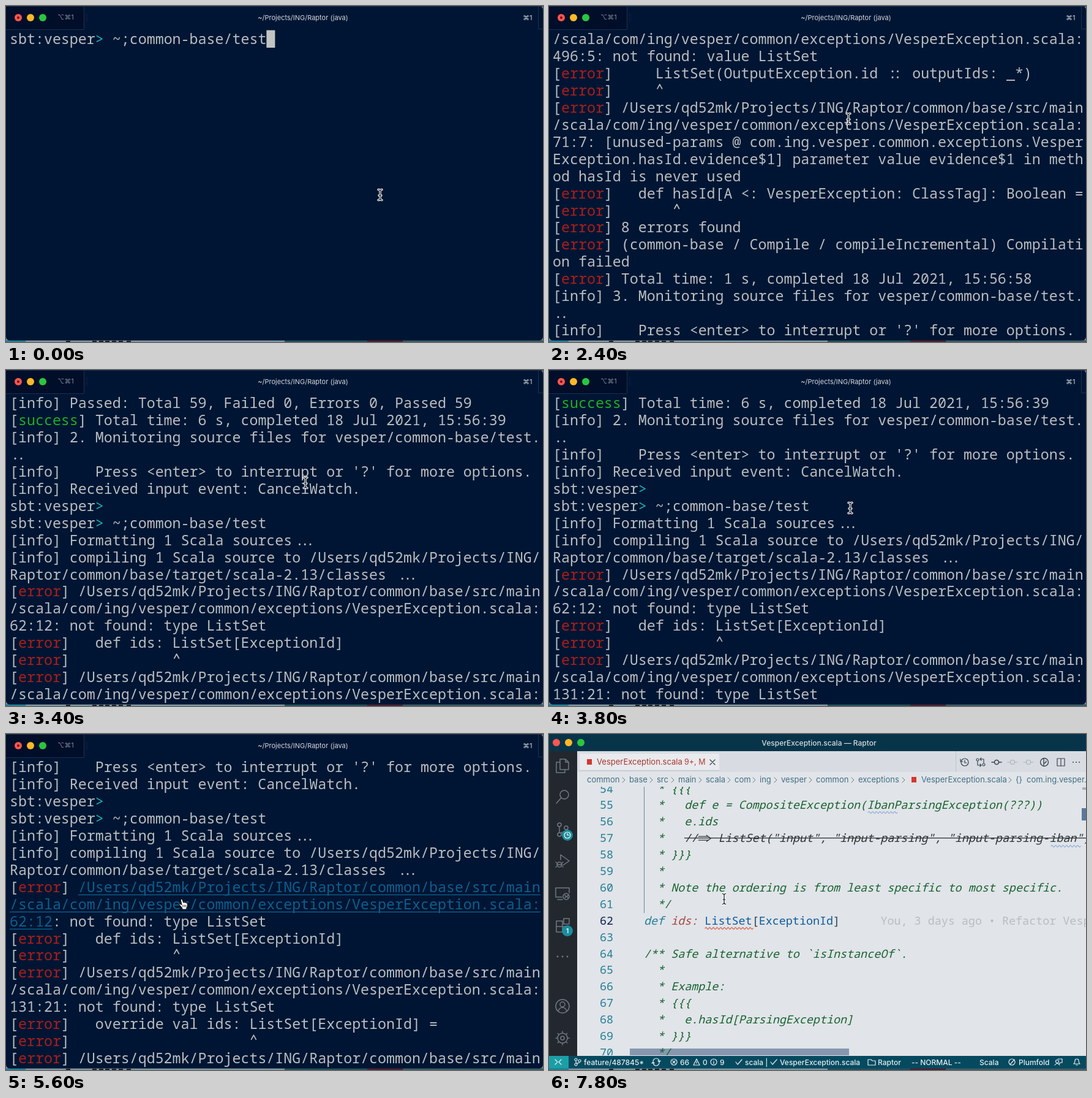
Recreate the animation shown at these times as an HTML page with a canvas. Size 877 by 548 pixels, loop 8 s.

```html
<!DOCTYPE html>
<html lang="en">
<head>
<meta charset="utf-8">
<title>From compiler error to editor</title>
<style>
html, body { margin: 0; width: 100%; height: 100%; overflow: hidden; background: #001533; }
canvas { display: block; width: 877px; height: 548px; }
</style>
</head>
<body>
<canvas></canvas>
<script>
const W = 877, H = 548, LOOP = 8000;
const canvas = document.querySelector('canvas');
const g = canvas.getContext('2d');
const dpr = window.devicePixelRatio || 1;
canvas.width = W * dpr;
canvas.height = H * dpr;
g.scale(dpr, dpr);

const MONO = '"Noto Sans Mono", monospace';
const UI = 'Inter, "DejaVu Sans", sans-serif';

// ---------- drawing helpers ----------
function rect(x, y, w, h, color) {
  g.fillStyle = color;
  g.fillRect(x, y, w, h);
}
function disc(x, y, r, color) {
  g.fillStyle = color;
  g.beginPath();
  g.arc(x, y, r, 0, 7);
  g.fill();
}
function text(str, x, y, color, font, align = 'left') {
  g.font = font;
  g.fillStyle = color;
  g.textAlign = align;
  g.fillText(str, x, y);
}
function icon(x, y, d, color, width = 1.2, fill) {
  const path = new Path2D(d);
  g.save();
  g.translate(x, y);
  g.lineJoin = g.lineCap = 'round';
  if (fill) { g.fillStyle = fill; g.fill(path); }
  g.strokeStyle = color;
  g.lineWidth = width;
  g.stroke(path);
  g.restore();
}
const circle = (r, x = 0, y = 0) => `M${x + r} ${y}a${r} ${r} 0 1 1 ${-2 * r} 0a${r} ${r} 0 1 1 ${2 * r} 0`;

function lights(x, y) {
  ['#fc5650', '#fdb827', '#29c73f'].forEach((c, i) => disc(x + 20 * i, y, 6, c));
}
function iBeam(x, y) {
  const d = 'M-3-8.5Q0-8.5 0-6Q0-8.5 3-8.5M0-6V6M-3 8.5Q0 8.5 0 6Q0 8.5 3 8.5M-2 1H2';
  icon(x, y, d, '#fff', 3.4);
  icon(x, y, d, '#111', 1.2);
}
function hand(x, y) {
  icon(x, y, 'M-4-7q1.6-1.8 3 0l2 5q1-1.5 2.4 0q1.4-1 2.2.6q1.7-.4 1.8 1.4v4l-1.6 3v2h-6.5' +
    'l-1.4-3l-4.2-4.6q.2-2 2.2-1.2l2 1.4z', '#111', 1.2, '#fff');
  icon(x, y, 'M0 2v3M2.4 2v3M4.7 2v3', '#111', 0.9);
}
function desktop() {
  rect(0, 0, W, H, '#7e96a0');
  rect(0, 545, 32, 3, '#2a7f96');
  for (const x of [98, 141, 152, 162, 173, 184, 197]) rect(x, 546, 7, 2, '#1a2026');
  rect(455, 545, 135, 3, '#26505a');
  rect(590, 545, 58, 3, '#4a2434');
  rect(648, 545, 229, 3, '#3d5c66');
}

// ---------- terminal ----------
const CELL = 13.98, ROW = 27.95, LEFT = 6, TOP = 40, ROWS = 18;
const TERM_FONT = `23.3px ${MONO}`;
const INK = '#b8bebf', LINK = '#0c5f8d';

const notFound = (pos, kind, code, caret) => [
  '[error] /Users/qd52mk/Projects/ING/Raptor/common/base/src/main',
  '/scala/com/ing/vesper/common/exceptions/VesperException.scala:',
  `${pos}: not found: ${kind} ListSet`,
  ...code,
  '[error]' + ' '.repeat(caret - 7) + '^',
];
const override = (mod = '') => [`[error]   override ${mod}val ids: ListSet[ExceptionId] =`];
const buffer = [
  '[info] Passed: Total 59, Failed 0, Errors 0, Passed 59',
  '[success] Total time: 6 s, completed 18 Jul 2021, 15:56:39',
  '[info] 2. Monitoring source files for vesper/common-base/test.',
  '..',
  "[info]    Press <enter> to interrupt or '?' for more options.",
  '[info] Received input event: CancelWatch.',
  'sbt:vesper>',
  'sbt:vesper> ~;common-base/test',
  '[info] Formatting 1 Scala sources...',
  '[info] compiling 1 Scala source to /Users/qd52mk/Projects/ING/',
  'Raptor/common/base/target/scala-2.13/classes ...',
  ...notFound('62:12', 'type', ['[error]   def ids: ListSet[ExceptionId]'], 19),
  ...notFound('131:21', 'type', override(), 28),
  ...notFound('172:21', 'type', override(), 28),
  ...notFound('173:21', 'value', [
    '[error]     errors.foldLeft(ListSet.empty[ExceptionId])(_ ++ _',
    '.ids) + CompositeException.id'], 28),
  ...notFound('272:27', 'type', override('final '), 34),
  ...notFound('273:9', 'value', ['[error]         ListSet(InputException.id :: inputIds: _*)'], 16),
  ...notFound('495:27', 'type', override('final '), 34),
  ...notFound('496:5', 'value', ['[error]     ListSet(OutputException.id :: outputIds: _*)'], 12),
  ...notFound('', '', [], 8).slice(0, 2),
  '71:7: [unused-params @ com.ing.vesper.common.exceptions.Vesper',
  'Exception.hasId.evidence$1] parameter value evidence$1 in meth',
  'od hasId is never used',
  '[error]   def hasId[A <: VesperException: ClassTag]: Boolean =',
  '[error]       ^',
  '[error] 8 errors found',
  '[error] (common-base / Compile / compileIncremental) Compilati',
  'on failed',
  '[error] Total time: 1 s, completed 18 Jul 2021, 15:56:58',
  '[info] 3. Monitoring source files for vesper/common-base/test.',
  '..',
  "[info]    Press <enter> to interrupt or '?' for more options.",
];
const COMMAND = 7, FIRST_ERROR = 11, END = buffer.length + 1 - ROWS;

const TOKENS = /((?<=^\[)(?:error|success)(?=\])|(?<=^sbt:vesper)>|\.{2,3}|\+\+|::|=>|\^)/;
const TOKEN_COLORS = { error: '#a81f1a', success: '#1fae22', '>': '#19b3b5' };
const LIGATURE_STEP = { '..': 10, '...': 8.8, '++': 11, '::': 8.5 };
const DRAWN_GLYPHS = { '=>': 'M2-3H21M2 3H21M18-7L26 0L18 7', '^': 'M3.2-3L7-10L10.8-3' };

function termLine(str, row, color = INK, col = 0) {
  const y = TOP + row * ROW + 22;
  for (const part of str.split(TOKENS)) {
    const x = LEFT + col * CELL;
    const step = LIGATURE_STEP[part];
    if (step) {
      const start = x + (part.length - 1) * (CELL - step) / 2;
      [...part].forEach((ch, i) => text(ch, start + i * step, y, color, TERM_FONT));
    } else if (DRAWN_GLYPHS[part]) {
      icon(x, y - 8, DRAWN_GLYPHS[part], color, 1.7);
    } else {
      text(part, x, y, TOKEN_COLORS[part] || color, TERM_FONT);
    }
    col += part.length;
  }
}
function linkPart(str, row, from) {
  const y = TOP + row * ROW;
  const x = LEFT + from * CELL, w = str.length * CELL;
  rect(x, y, w, ROW, '#001533');
  termLine(str, row, LINK, from);
  rect(x, y + 26, w, 1.4, LINK);
}
function block(row, col = 0) {
  rect(LEFT + col * CELL, TOP + row * ROW - 0.5, CELL, 28.5, '#c2c4c4');
}

function terminal(s) {
  desktop();
  g.fillStyle = '#001533';
  g.beginPath();
  g.roundRect(0, 0, W, 545.5, 6);
  g.fill();
  rect(0, 0, 127, 38, '#000e29');
  rect(0, 38, 127, 1, '#183052');
  rect(127, 0, 1, 38, '#183052');
  rect(869, 0, 1, 38, '#183052');
  rect(870, 37, 7, 1, '#183052');
  rect(0, 0, W, 1, '#23324c');
  for (let y = 12; y < 27; y += 3) rect(130, y, 4, 1, '#0e2343');
  lights(20, 19);
  disc(20, 19, 2, '#6d0b0a');
  text('⌥⌘1', 84, 22, '#7f8898', `11px ${UI}`);
  text(`~/Projects/ING/Raptor (${s.job || 'java'})`, 485, 23, '#d3d7de', `11px ${UI}`, 'center');
  text('⌘1', 844, 23, '#d3d7de', `11px ${UI}`);

  const last = s.until ?? buffer.length;
  const shown = buffer.slice(s.top, Math.min(last, s.top + ROWS));
  shown.forEach((line, row) => termLine(line, row));
  const cursorRow = last - s.top;
  if (s.prompt) block(0, 30);
  else if (cursorRow < ROWS) block(cursorRow);
  if (s.task) termLine(`  | => common-base / Compile / ${s.task} 0s`, cursorRow + 1);
  if (s.link) {
    const row = FIRST_ERROR - s.top;
    linkPart(buffer[FIRST_ERROR].slice(8), row, 8);
    linkPart(buffer[FIRST_ERROR + 1], row + 1, 0);
    linkPart('62:12', row + 2, 0);
  }
  if (s.mouse) (s.link ? hand : iBeam)(...s.mouse);
}

// ---------- editor ----------
const CODE_X = 155, CODE_CELL = 11.04, LINE = 26.9;
const GREEN = '#176331', TEAL = '#237f98', BLUE = '#0d5c9c';
const CODE_FONT = `18.4px ${MONO}`;
const source = [
  '  * {{{',
  '  *   def e = CompositeException(IbanParsingException(???))',
  '  *   e.ids',
  '  *',
  '  * }}}',
  '  *',
  '  * Note the ordering is from least specific to most specific.',
  '  */',
  '',
  '',
  '/** Safe alternative to `isInstanceOf`.',
  '  *',
  '  * Example:',
  '  * {{{',
  '  *   e.hasId[ParsingException]',
  '  * }}}',
  '  */',
];
const lineY = n => 89 + (n - 54) * LINE + 6.5;
function code(str, col, n, color, style = '') {
  text(str, CODE_X + col * CODE_CELL, lineY(n), color, `${style} ${CODE_FONT}`);
}
function squiggle(x, y, w, color) {
  let d = 'M0 0';
  for (let i = 0; i < w / 6; i++) d += 'q1.5-3 3 0t3 0';
  icon(x, y, d, color, 1.2);
}

function sourceCode(blame) {
  g.save();
  g.beginPath();
  g.rect(47, 86, W - 47, 438);
  g.clip();
  rect(132, 513, 358, 11, '#8598b0');
  rect(155, 86, 1, 206, '#5e8c9a');
  source.forEach((line, i) => {
    const n = 54 + i;
    text(n, 105, lineY(n), n === 62 ? '#0b1f4f' : TEAL, CODE_FONT, 'right');
    code(line, 0, n, GREEN, 'italic');
  });
  code('//', 6, 57, '#2d3436', 'italic');
  icon(CODE_X + 8 * CODE_CELL, lineY(57) - 6, 'M1-3H17M1 3H17M14-5L21 0L14 5', '#2d3436', 1.3);
  code('ListSet("input", "input-parsing", "input-parsing-iban")', 11, 57, '#2d3436', 'italic');
  rect(221, 169, 656, 1.3, '#2d3436');
  code('def', 0, 62, TEAL, 'italic');
  code('ids:', 4, 62, '#a8453f', 'italic');
  code('ListSet', 9, 62, BLUE);
  code('[', 16, 62, '#34404a');
  code('ExceptionId', 17, 62, BLUE);
  code(']', 28, 62, '#34404a');
  if (blame) code('You, 3 days ago • Refactor VesperException', 35, 62, '#b8bdc3');
  squiggle(255, 317, 76, '#d9482f');
  squiggle(521, 128, 44, '#7fa8d6');
  squiggle(820, 183, 44, '#7fa8d6');
  g.restore();
  rect(870, 121, 7, 20, '#58799b');
  rect(871, 87, 6, 4, '#a8b0b8');
}

function badge(y, d) {
  disc(30, y, 9, '#1b8d9c');
  if (d) icon(30, y, d, '#fff', 1.2);
  else text('1', 30, y + 3.5, '#fff', `600 10px ${UI}`, 'center');
}
function activityBar() {
  rect(0, 28, 46, 497, '#23282f');
  const gearTeeth = Array.from({ length: 8 }, (_, i) => {
    const a = i * Math.PI / 4, c = Math.cos(a), s = Math.sin(a);
    return `M${8 * c} ${8 * s}L${11 * c} ${11 * s}`;
  }).join('');
  const icons = [
    [52, 'M-4-11H5L10-6V6H-4ZM5-11V-6H10M-4-6H-10V11H4V6'],
    [103, circle(7, 3, -4) + 'M-2 1L-10 10'],
    [156, circle(3, -5, -8) + circle(3, -5, 8) + circle(3, 6, -3) + 'M-5-5V5M6 0Q5 4-3 5'],
    [208, 'M-3-3V-11L11-1L1 6' + circle(4, -5, 5) + 'M-11 1l3 2M-11 9l3-2M1 1l-3 2M1 9l-3-2M-9 5h8'],
    [260, 'M-1 6H-11V-9H11V-1M-8 10H0' + circle(5, 6, 5) + 'M4 3l2 2l-2 2M9 3l-2 2l2 2'],
    [312, 'M-10-7H0V11H-10ZM-10 2H10V11H0M2-11H11V-2H2Z'],
    [444, circle(11) + circle(4, 0, -3) + 'M-7 8Q-5 2 0 2T7 8'],
    [496, circle(8) + circle(3) + gearTeeth],
  ];
  for (const [y, d] of icons) icon(22, y, d, '#707983', 1.5);
  for (const x of [14, 22, 30]) disc(x, 363, 1.4, '#707983');
  badge(165, circle(5) + 'M0-3V0H3');
  badge(321);
}

function tabsAndPath() {
  rect(46, 28, W - 46, 34, '#d8dce2');
  rect(50, 32, 228, 27, '#e8eaed');
  rect(50, 59, 228, 1, '#b9c3cc');
  rect(664, 28, 1, 34, '#bcc4cc');
  rect(62, 41, 8, 9, '#d5372f');
  text('VesperException.scala', 78, 50, '#a63430', `13px ${UI}`);
  text('9+, M', 221, 50, '#b43a34', `12.5px ${UI}`);
  icon(267, 46, 'M-4-4L4 4M4-4L-4 4', '#34404a');

  const dark = '#39434d', pale = '#a9b1b9';
  const ring = circle(3.5) + 'M-8 0H-3.5M3.5 0H8';
  icon(679, 46, circle(6) + 'M0-3V1H3M-7-5V-1H-3', dark);
  icon(705, 46, circle(2, -5, -4) + circle(2, 5, 4) + 'M-5-2V5H1M5 2V-5H-1M-1 3l2 2l-2 2M1-7l-2 2l2 2', dark);
  icon(731, 46, ring, dark, 1.6);
  icon(757, 46, ring, pale);
  icon(783, 46, ring, pale);
  icon(809, 46, circle(6.5) + 'M-1-5V5M-1 2Q3 1 3-2', dark, 1.4);
  icon(836, 46, 'M-6-6H6V6H-6ZM0-6V6', dark);
  for (const x of [856, 861, 866]) disc(x, 46, 1, dark);

  const crumbs = [['common', 62], ['base', 131], ['src', 176], ['main', 211], ['scala', 256], ['com', 303],
    ['ing', 344], ['vesper', 379], ['common', 436], ['exceptions', 505], ['VesperException.scala', 608]];
  crumbs.forEach(([name, x], i) => {
    text(name, x, 79, '#3f6f86', `13px ${UI}`);
    const next = i < 9 ? crumbs[i + 1][1] - 9 : i === 9 ? 579 : 753;
    icon(next, 75, 'M-2-4L2 0L-2 4', '#5f7d8c', 1);
  });
  rect(592, 70, 8, 9, '#d5372f');
  text('{}', 762, 79, '#3f6f86', `13px ${UI}`);
  text('com.ing.vesper.common', 780, 79, '#3f6f86', `13px ${UI}`);
}

function statusBar() {
  const white = '#e6eef0';
  rect(0, 525, W, 20.5, '#064a60');
  rect(0, 525, 32, 20.5, '#1b9fa6');
  icon(15, 535, 'M-5-4l4 4l-4 4M5-4l-4 4l4 4', white);
  icon(47, 535, circle(2, -3, -4) + circle(2, -3, 4) + circle(2, 3, -2) + 'M-3-2V2M3 0Q3 2-3 2', white);
  icon(175, 535, 'M-5-1A5 5 0 0 1 5-1M5 1A5 5 0 0 1-5 1M3-2l2 2l2-2M-7 2l2-2l2 2', white);
  icon(204, 535, circle(5) + 'M-2-2l4 4M2-2l-4 4', white);
  icon(241, 535, 'M0-5L5 5H-5ZM0-1V2', white);
  icon(269, 535, circle(5) + 'M0-1V3M0-3V-3', white);
  for (const x of [310, 367]) icon(x, 535, 'M-5 0l3 4l7-8', white);
  icon(527, 535, 'M-6-4H-1L1-2H6V5H-6Z', white);
  icon(756, 535, circle(5) + 'M-3 4L4-4', white);
  icon(832, 535, circle(2.5, -2, -1) + 'M-6 5Q-2 0 2 5M-1-5H6V1H3L1 3', white);
  icon(862, 535, 'M-5 3Q-3 1-3-2Q-3-5 0-5T3-2Q3 1 5 3ZM-1 5H1', white);
  const labels = [['feature/487845*', 57], ['66', 214], ['0', 251], ['9', 279], ['scala |', 320],
    ['VesperException.scala', 377], ['Raptor', 537], ['-- NORMAL --', 592], ['Scala', 703], ['Plumfold', 767]];
  for (const [label, x] of labels) text(label, x, 539.5, white, `500 12px ${UI}`);
}

function editor(s) {
  desktop();
  rect(0, 0, W, 545, '#e1e4e8');
  rect(0, 0, W, 28, '#08344a');
  lights(12, 14);
  text('VesperException.scala — Raptor', 441, 18.5, '#d5dde1', `500 12px ${UI}`, 'center');
  sourceCode(s.blame);
  tabsAndPath();
  activityBar();
  statusBar();
  iBeam(...s.mouse);
}

// ---------- timeline: [start time, state] ----------
const scroll = (top, x, y, link) => ({ top, mouse: [x, y], link });
const timeline = [
  [0, { top: COMMAND, until: COMMAND + 1, prompt: true, mouse: [611, 308] }],
  [1200, { top: COMMAND, until: COMMAND + 2, job: '114:118', task: 'scalafmt' }],
  [1400, { top: COMMAND, until: FIRST_ERROR, job: '114:118', task: 'compileIncremental' }],
  [1600, { top: 17, until: 32, job: '114:118', task: 'scalafmt' }],
  [1790, { top: END }],
  [2190, scroll(END, 520, 205)],
  [2400, scroll(END - 1, 489, 184)],
  [2600, scroll(END - 5, 489, 184)],
  [2800, scroll(39, 489, 184)],
  [3000, scroll(22, 489, 184)],
  [3200, scroll(6, 489, 184)],
  [3400, scroll(0, 489, 184)],
  [3600, scroll(0, 490, 196)],
  [3800, scroll(1, 492, 225)],
  [4000, scroll(2, 494, 260)],
  [4200, scroll(2, 495, 275)],
  [4600, scroll(3, 495, 275)],
  [4800, scroll(4, 482, 275)],
  [5000, scroll(4, 420, 276)],
  [5200, scroll(4, 335, 277)],
  [5400, scroll(4, 292, 277)],
  [5600, scroll(4, 289, 277, true)],
  [6400, scroll(4, 289, 275)],
  [6600, scroll(4, 287, 271)],
  [6800, scroll(4, 286, 269)],
  [7400, { editor: true, mouse: [286, 269] }],
  [7600, { editor: true, mouse: [286, 269], blame: true }],
];

function frame() {
  const t = performance.now() % LOOP;
  const [, state] = timeline.findLast(([start]) => start <= t);
  (state.editor ? editor : terminal)(state);
  requestAnimationFrame(frame);
}
frame();
</script>
</body>
</html>
```
